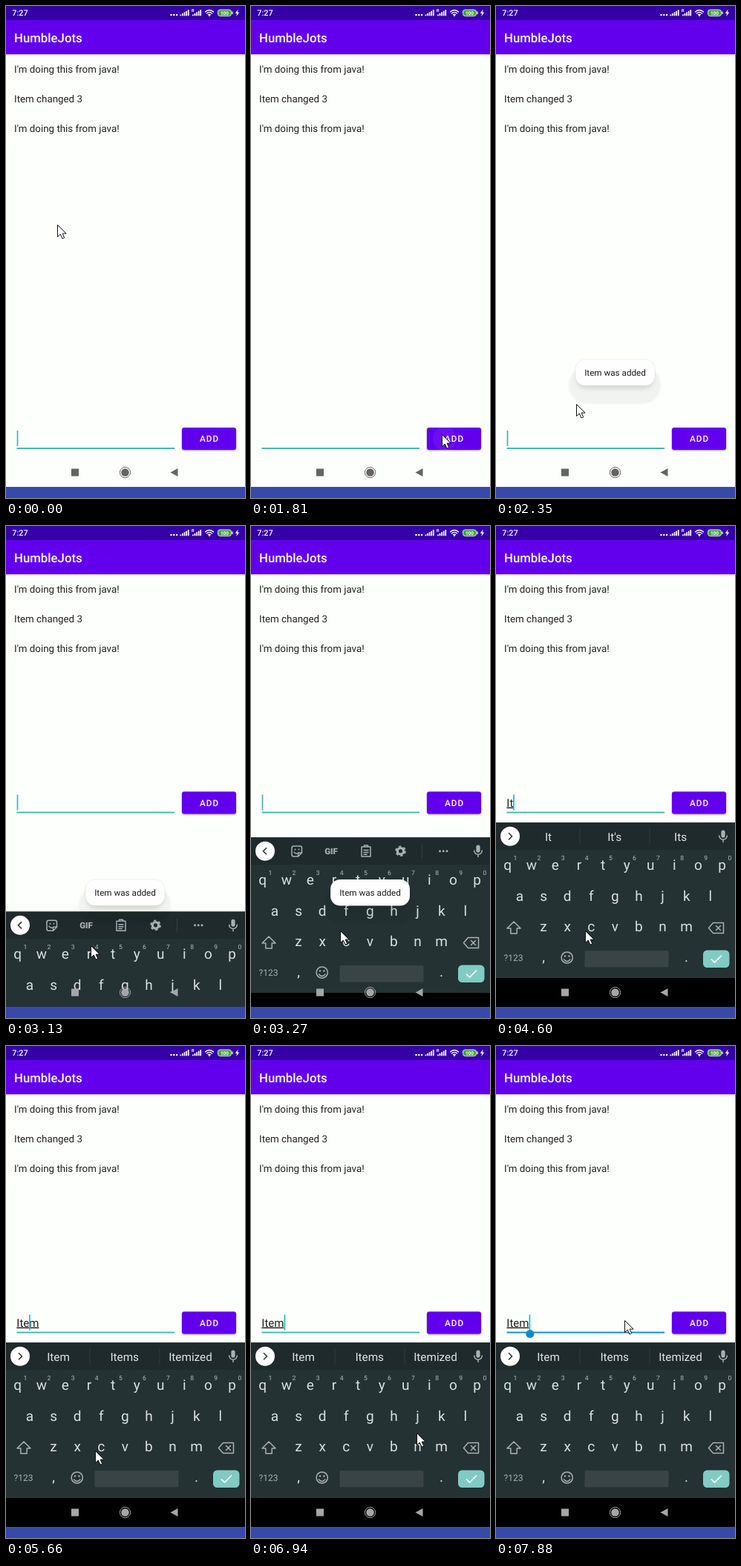
Write an HTML page that moves like this. It is 322 px wide and 664 px high and loops after 8000 ms.

```html
<!DOCTYPE html>
<html lang="en">
<head>
<meta charset="utf-8">
<title>To-do list demo</title>
<style>
  html, body { margin: 0; width: 100%; height: 100%; overflow: hidden; background: #fdfffc; }
  svg { display: block; width: 322px; height: 664px; }
  text { font-family: Roboto, "Noto Sans", sans-serif; white-space: pre; text-rendering: geometricPrecision; }
  .mid { text-anchor: middle; }
  .item { font-size: 13.35px; fill: #222; }
  .bold { font-weight: 500; fill: #fff; }
  .key { font-size: 19px; fill: #d9dfe0; text-anchor: middle; }
  .hint { font-size: 8.6px; fill: #b4bcbd; text-anchor: middle; }
  .word { font-size: 15.3px; fill: #dfe4e5; text-anchor: middle; }
  .line { fill: none; stroke: #a9b1b2; stroke-width: 1.5; stroke-linejoin: round; stroke-linecap: round; }
  .solid { fill: #a9b1b2; }
</style>
</head>
<body>
<svg viewBox="0 0 322 664">
  <defs>
    <clipPath id="btnClip"><rect x="237" y="569" width="73" height="30" rx="3"/></clipPath>
    <filter id="soft" x="-30%" y="-60%" width="160%" height="220%"><feGaussianBlur stdDeviation="3"/></filter>
    <filter id="tight" x="-20%" y="-30%" width="140%" height="160%"><feGaussianBlur stdDeviation="1"/></filter>
  </defs>

  <rect width="322" height="664" fill="#fdfffc"/>
  <rect y="65" width="322" height="1" fill="#cfc4e4"/>
  <rect y="19" width="322" height="46" fill="#6200ee"/>
  <rect width="322" height="19" fill="#3500a8"/>
  <text x="8.3" y="13" class="bold" font-size="10.8">7:27</text>
  <text x="11" y="48.7" class="bold" font-size="16.8">HumbleJots</text>

  <g id="status" fill="#fff">
    <circle cx="222.5" cy="12" r="1.3"/><circle cx="226.3" cy="12" r="1.3"/><circle cx="230.1" cy="12" r="1.3"/>
    <text x="250" y="8" font-size="5.5" font-weight="700">R</text>
    <g fill="none" stroke="#fff" stroke-width="1.3">
      <path d="M268 8.2Q274 2.8 280 8.2M270 10.2Q274 6.6 278 10.2M272 12Q274 10.2 276 12"/>
    </g>
    <circle cx="274" cy="13" r="1"/>
    <rect x="285.5" y="5" width="18" height="8.6" rx="3" fill="#46a83c" stroke="#cfe8cf"/>
    <rect x="304.3" y="7.5" width="1.5" height="3.6" fill="#cfe8cf"/>
    <text x="294.5" y="11.7" class="mid" font-size="6.5" font-weight="700">100</text>
    <path d="M312.6 4.5L308.8 10h2.3l-.8 4 4-5.6h-2.4z"/>
  </g>

  <text x="11" y="90.3" class="item">I'm doing this from java!</text>
  <text x="11" y="130" class="item">Item changed 3</text>
  <text x="11" y="169.7" class="item">I'm doing this from java!</text>

  <g id="form">
    <rect id="rule" x="14.5" y="596" width="212.5" height="2"/>
    <text id="typed" x="14.3" y="589" font-size="15" fill="#222" text-decoration="underline"></text>
    <rect id="caret" y="573" width="1.8" height="21"/>
    <circle id="handle" cx="45.8" cy="599" r="5.5" fill="#0b86d6"/>
    <rect x="237" y="570" width="73" height="30" rx="3" opacity=".4" filter="url(#tight)"/>
    <rect x="237" y="569" width="73" height="30" rx="3" fill="#6200ee"/>
    <circle id="ripple" cx="261" cy="584" fill="#fff" clip-path="url(#btnClip)"/>
    <text x="261" y="588.2" class="bold" font-size="11.7" letter-spacing="1.04">ADD</text>
  </g>

  <g id="board">
    <rect y="400.3" width="322" height="210" fill="#243233"/>
    <rect y="400.3" width="322" height="36.7" fill="#1e2a2b"/>
    <rect y="610" width="322" height="39"/>
    <circle cx="19" cy="418.7" r="13" fill="#fff"/>
    <path id="chevron" fill="none" stroke="#2d3839" stroke-width="1.6"/>
    <g id="tools">
      <path class="line" d="M57.500 412h8.500q2.500 0 2.500 2.500v6.500l-5 5h-6q-2.500 0-2.500-2.500v-9q0-2.500 2.500-2.500zM68.500 421h-5v5M58 420q1.500 2.500 4 2"/>
      <circle class="solid" cx="59.500" cy="416.500" r="1"/><circle class="solid" cx="64.500" cy="416.500" r="1"/>
      <text x="108" y="422.500" class="mid" font-size="11.500" font-weight="900" fill="#a9b1b2">GIF</text>
      <path class="line" d="M149 413h12v13h-12zM152.500 413v-2h5v2zM152 417.500h6M152 420.500h6M152 423.300h4"/>
      <circle cx="201.500" cy="418.700" r="4.200" fill="none" stroke="#a9b1b2" stroke-width="3.200"/>
      <circle cx="201.500" cy="418.700" r="6.300" fill="none" stroke="#a9b1b2" stroke-width="2" stroke-dasharray="3.300"/>
      <rect x="230" y="410" width="1" height="18" fill="#344041"/>
      <circle class="solid" cx="254.500" cy="418.700" r="1.500"/><circle class="solid" cx="259.200" cy="418.700" r="1.500"/><circle class="solid" cx="264" cy="418.700" r="1.500"/>
    </g>
    <g id="words">
      <text class="word" x="70.500" y="424.600"></text>
      <text class="word" x="159.700" y="424.600"></text>
      <text class="word" x="248.500" y="424.600"></text>
      <rect x="112.500" y="408" width="1" height="22" fill="#303c3d"/>
      <rect x="206.500" y="408" width="1" height="22" fill="#303c3d"/>
    </g>
    <rect class="solid" x="303.400" y="410.500" width="5.200" height="10" rx="2.600"/>
    <path class="line" d="M300.700 418a5.300 5.300 0 0 0 10.600 0M306 423.500v3"/>
    <g id="keys"></g>
    <path id="shift" d="M24 534l9 9h-4.800v7h-8.400v-7H15z" stroke="#a9b1b2" stroke-width="1.500" stroke-linejoin="round"/>
    <path class="line" d="M292.500 535.500h14v14h-14l-6-7zM296.500 539.500l6 6M302.500 539.500l-6 6"/>
    <text x="23.500" y="587" class="mid" font-size="12" fill="#a9b1b2">?123</text>
    <text x="64" y="588" class="key" font-size="17">,</text>
    <circle class="line" cx="95.700" cy="582.500" r="7.600"/>
    <path class="line" d="M91.500 585q4.200 5 8.400 0"/>
    <circle class="solid" cx="93" cy="580.500" r="1.200"/><circle class="solid" cx="98.400" cy="580.500" r="1.200"/>
    <rect x="119.500" y="573" width="113" height="22.500" rx="1.500" fill="#384446"/>
    <text x="256.500" y="588" class="key" font-size="17">.</text>
    <rect x="279" y="572.500" width="35.500" height="23.500" rx="5.500" fill="#80cbc4"/>
    <path d="M290 584.500l4.500 4.500 9.500-9.500" fill="none" stroke="#fff" stroke-width="1.700"/>
  </g>

  <g id="nav">
    <rect x="88" y="624.500" width="10" height="10"/>
    <circle cx="160.500" cy="629.500" r="5.300"/>
    <circle cx="160.500" cy="629.500" r="7.100" fill="none" stroke="currentColor"/>
    <path d="M231.500 624v11l-10-5.500z"/>
  </g>

  <g id="toast">
    <rect x="98" y="487" width="124" height="50" rx="24" opacity=".045" filter="url(#tight)"/>
    <rect x="109" y="482" width="103" height="34" rx="13" opacity=".13" filter="url(#soft)"/>
    <rect x="107" y="477" width="107" height="35.500" rx="13" fill="#fdfefd" stroke="#000" stroke-opacity=".05"/>
    <text x="160.500" y="498.700" class="mid" font-size="11.700" fill="#1c1c1c">Item was added</text>
  </g>

  <rect y="649" width="322" height="15" fill="#3949ab"/>
  <path id="mouse" d="M.500 .500v16l3.800-3.400 2.700 5.900 2.700-1.200-2.600-5.700h5z" fill="#fff" stroke="#111"/>
</svg>
<script>
const LOOP = 8000;
const $ = id => document.getElementById(id);
const set = (el, attrs) => { for (const k in attrs) el.setAttribute(k, attrs[k]); };
const clamp = v => Math.max(0, Math.min(1, v));
const show = (id, on) => set($(id), { visibility: on ? 'visible' : 'hidden' });

function add(parent, tag, attrs, text = '') {
  const el = document.createElementNS('http://www.w3.org/2000/svg', tag);
  set(el, attrs);
  el.textContent = text;
  return parent.appendChild(el);
}

// Signal bars
for (const x of [234.5, 251])
  for (let i = 0; i < 5; i++)
    add($('status'), 'rect', { x: x + i * 2.6, y: 11.5 - i * 1.6, width: 1.7, height: 1.8 + i * 1.6 });

// Letter keys: text, first x, lower and upper baselines
const rows = [['qwertyuiop', 15.7, 464.3, 466], ['asdfghjkl', 32, 506, 507.8], ['zxcvbnm', 64, 547.3, 549.5]];
const keys = [];
rows.forEach(([chars, x0, low, high], r) => [...chars].forEach((char, i) => {
  const x = x0 + i * 32.1;
  keys.push({ char, low, high, el: add($('keys'), 'text', { class: 'key', x }) });
  if (!r) add($('keys'), 'text', { class: 'hint', x: x + 10.2, y: 451 }, (i + 1) % 10);
}));

const runs = [[120, 1050, 8], [1170, 1810, 5], [1940, 2200, 3], [2350, 2620, 3], [2890, 3270, 4], [3390, 3390, 1],
  [3940, 4720, 7], [5120, 5660, 4], [6390, 6390, 1], [6790, 7510, 6], [7880, 7880, 1]];
const ticks = runs.flatMap(([a, b, n]) =>
  Array.from({ length: n }, (_, i) => Math.round(a + (b - a) * i / Math.max(1, n - 1))));
const snap = t => ticks.reduce((last, tick) => tick <= t ? tick : last, 0);

const path = [[0, 69, 295], [1050, 257, 578], [1810, 257, 578], [2350, 108, 537], [2620, 112, 573], [2890, 112, 573],
  [3270, 120, 546], [6260, 120, 546], [6390, 197, 550], [6790, 232, 573], [7222, 196, 376], [7510, 173, 370]];
function mouseAt(t) {
  const i = path.findIndex(p => p[0] > t);
  if (i < 0) return path[path.length - 1].slice(1);
  const [a, b] = [path[i - 1], path[i]];
  const u = (t - a[0]) / (b[0] - a[0]), e = u * u * (3 - 2 * u);
  return [a[1] + (b[1] - a[1]) * e, a[2] + (b[2] - a[2]) * e];
}

const typing = [4200, 4460, 4720, 5120];
const hints = [['', '', ''], ['I', "I'm", 'It'], ['It', "It's", 'Its'], ['Ite', 'Item', 'Items'], ['Item', 'Items', 'Itemized']];
const caretX = [14.6, 18, 23, 31, 44.5];
const caretOff = [[500, 1000], [1430, 1940], [2480, 2800], [5290, 5470], [6390, 6790], [7200, 7880]];

function render(now) {
  const t = snap(now);
  const count = typing.filter(k => t >= k).length;
  const upper = t >= 3390 && !count;
  const touched = t >= 7510;

  set($('form'), { transform: `translate(0 ${t >= 3000 ? -210.4 : 0})` });
  set($('rule'), { fill: touched ? '#158fcb' : '#48b9b0' });
  $('typed').textContent = 'Item'.slice(0, count);
  set($('caret'), { x: caretX[count === 4 && t < 6390 ? 3 : count], fill: count ? '#1cc6bf' : '#48b9b0' });
  show('caret', !caretOff.some(([a, b]) => t >= a && t < b));
  show('handle', t >= 7880);

  const press = clamp((t - 1500) / 350);
  set($('ripple'), { r: 8 + press * 9, opacity: t >= 1600 && t < 2050 ? .06 : 0 });

  const slide = 248 * Math.pow(1 - clamp((t - 2800) / 590), 1.58);
  set($('board'), { transform: `translate(0 ${slide})` });
  show('board', t >= 2890);
  const grey = t >= 2890 ? '#a6a6a6' : '#646464';
  set($('nav'), { fill: grey, color: grey });

  for (const k of keys) {
    k.el.textContent = upper ? k.char.toUpperCase() : k.char;
    set(k.el, { y: upper ? k.high : k.low });
  }
  set($('shift'), { fill: upper ? '#a9b1b2' : 'none' });
  set($('chevron'), { d: count ? 'M17 414.2l4.500 4.500-4.500 4.500' : 'M21 414.200l-4.500 4.500 4.500 4.500' });
  $('tools').style.display = count ? 'none' : '';
  $('words').style.display = count ? '' : 'none';
  $('words').querySelectorAll('text').forEach((el, i) => el.textContent = hints[count][i]);

  const alpha = t < 3940 ? clamp((t - 1850) / 350) : clamp(.88 - (t - 3940) / 450);
  const size = t < 3940 ? 1 : .985;
  set($('toast'), { opacity: alpha, transform: `translate(160.500 495) scale(${size}) translate(-160.500 -495)` });

  set($('mouse'), { transform: `translate(${mouseAt(t).map(Math.round)})` });
}

const start = performance.now();
function frame() {
  render((performance.now() - start) % LOOP);
  requestAnimationFrame(frame);
}
frame();
</script>
</body>
</html>
```
